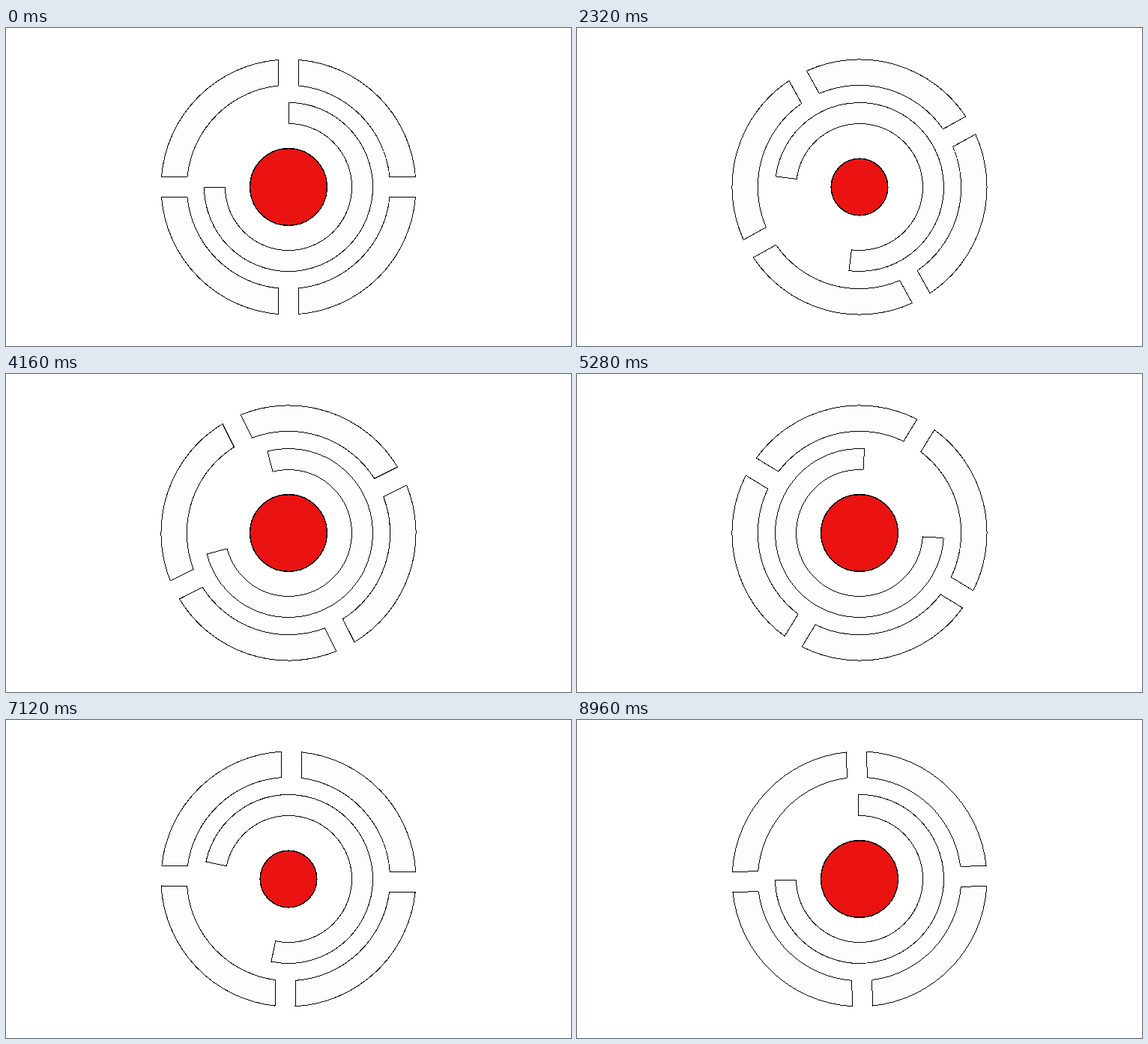
An HTML page for the animation above (9.04 s loop, 754 by 424 pixels).

```html
<!DOCTYPE html>
<html lang="en">
<head>
<meta charset="utf-8">
<title>Rotating rings</title>
<style>
  html, body { margin: 0; width: 100%; height: 100%; overflow: hidden; background: #fff; }
  svg { display: block; width: 100%; height: 100%; }
  path, circle { stroke: #000; stroke-width: 1; shape-rendering: crispEdges; }
  path { fill: #fdfdfd; }
  circle { fill: #eb1312; stroke-width: 1.5; }
</style>
</head>
<body>
<svg viewBox="0 0 754 424">
  <defs>
    <path id="segment" d="M13.5-169.5A170 170 0 0 1 169.5-13.5H135A135.7 135.7 0 0 0 13.5-135Z"/>
  </defs>
  <g transform="translate(377 212)">
    <g id="outer">
      <use href="#segment"/>
      <use href="#segment" transform="rotate(90)"/>
      <use href="#segment" transform="rotate(180)"/>
      <use href="#segment" transform="rotate(270)"/>
    </g>
    <path id="arc" d="M0-112.5A112.5 112.5 0 1 1-112.5 0H-84.5A84.5 84.5 0 1 0 0-84.5Z"/>
    <circle id="core" r="51.3"/>
  </g>
</svg>
<script>
const LOOP = 9040, STEP = 80;
const times = [0, 1440, 3120, 4160, 6320, 7840, 8960, LOOP];
const outerTurn = [0, 21.6, 106.1, 153.4, 255.7, 287, 358.65, 360];
const arcTurn = [0, 225.4, 310.3, 345.6, 571.4, 687.7, 719.2, 720];

const outer = document.getElementById('outer');
const arc = document.getElementById('arc');
const core = document.getElementById('core');

// Smooth curve through the poses that never runs backwards.
function curve(values) {
  const count = values.length - 1;
  const slopes = times.slice(1).map((t, i) => (values[i + 1] - values[i]) / (t - times[i]));
  const speeds = times.map((_, i) => {
    const before = slopes[(i + count - 1) % count], after = slopes[i % count];
    return 2 * before * after / (before + after);
  });
  return t => {
    let i = 0;
    while (t >= times[i + 1]) i++;
    const span = times[i + 1] - times[i], u = (t - times[i]) / span, v = 1 - u;
    return values[i] * v * v * (1 + 2 * u) + values[i + 1] * u * u * (3 - 2 * u)
      + span * u * v * (speeds[i] * v - speeds[i + 1] * u);
  };
}

const outerAngle = curve(outerTurn), arcAngle = curve(arcTurn);

// The core shrinks and grows back twice per loop.
function coreRadius(t) {
  const half = LOOP / 2, phase = t % half;
  const distance = Math.min(phase, half - phase);
  const shrink = Math.min(1, Math.max(0, (distance - 1000) / 400));
  return 51.3 - 13.5 * shrink;
}

function draw(now) {
  const t = Math.floor((now % LOOP) / STEP) * STEP;
  outer.setAttribute('transform', `rotate(${outerAngle(t)})`);
  arc.setAttribute('transform', `rotate(${arcAngle(t)})`);
  core.setAttribute('r', coreRadius(t));
}

const start = performance.now();
function tick() {
  draw(performance.now() - start);
  requestAnimationFrame(tick);
}
tick();
</script>
</body>
</html>
```
